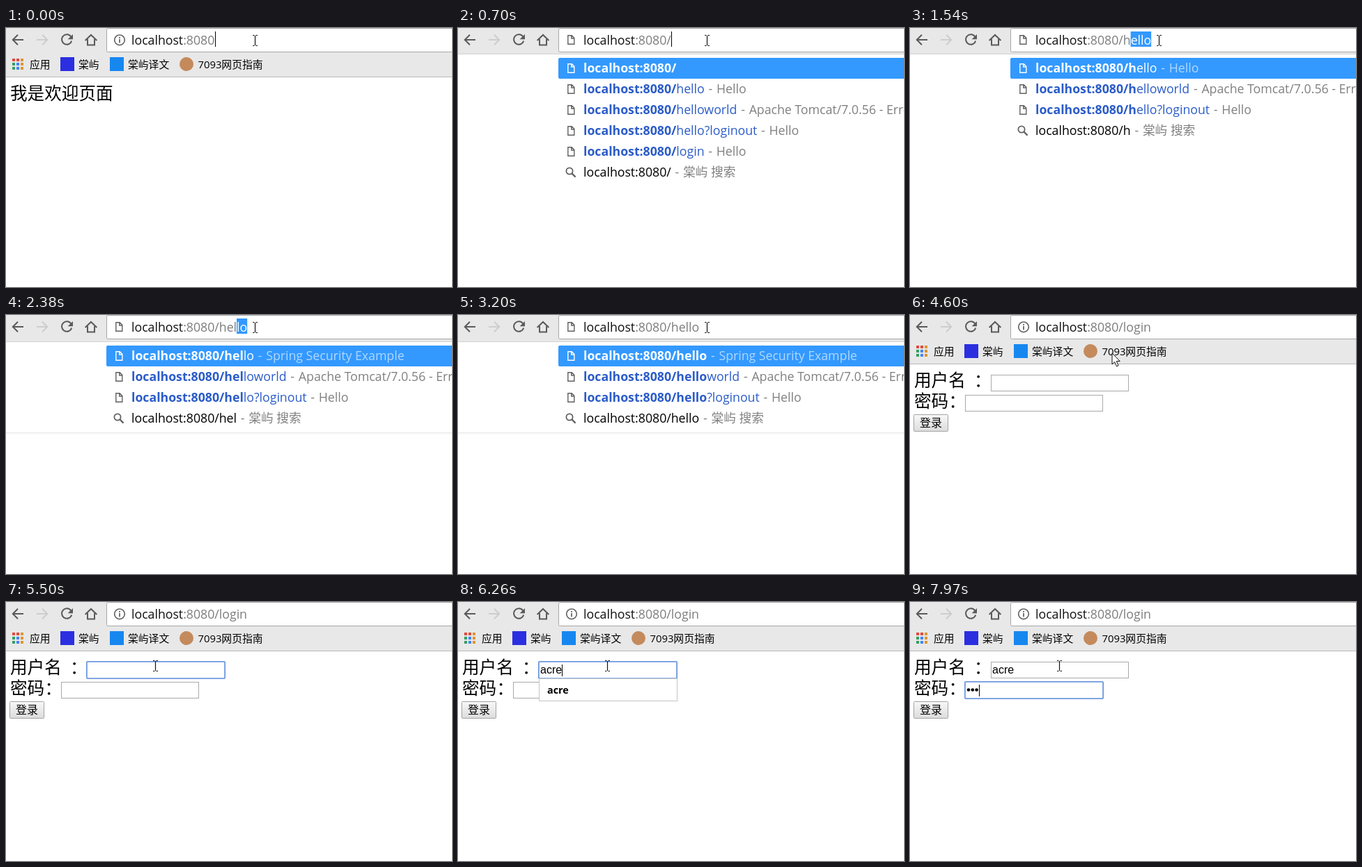
These frames come from a looping animation (640x373 px, 8 s). An HTML page:

```html
<!DOCTYPE html>
<html lang="zh-CN">
<head>
<meta charset="utf-8">
<title>Login demo</title>
<style>
  html, body { margin: 0; width: 100%; height: 100%; overflow: hidden; background: #fff; }
  svg { display: block; width: 100vw; height: 100vh; }
  text { white-space: pre; font: 17.7px "Open Sans", "Noto Sans CJK SC", "Noto Sans CJK", sans-serif; }
  .bold { font-weight: 700; }
  .sep { word-spacing: 1.2px; }
  .mark { font-size: 14.8px; }
  .page { font: 300 24.6px "Noto Sans CJK SC", "Noto Sans CJK", serif; }
  .button { font: 16px "Noto Sans CJK SC", "Noto Sans CJK", sans-serif; }
  .field { font: 16px "Liberation Sans", Arial, sans-serif; }
  .hint { font-size: 14.4px; font-weight: 700; }
</style>
</head>
<body>
<svg id="stage" viewBox="0 0 640 373" preserveAspectRatio="none"></svg>
<script>
const LOOP = 8000;
const HOST = 'localhost';
const PORT = ':8080';
const PATH = '/hello';
const ACCOUNT = 'acre';
const BLUE = '#3399ff';
const stage = document.getElementById('stage');
const pen = document.createElement('canvas').getContext('2d');

// Each list holds the moments at which one more character appears.
const pathKeys = [620, 1540, 2150, 2380, 2440, 2660];
const nameKeys = [5880, 5950, 6180, 6260];
const dotKeys = [7650, 7730, 7970];
const pointerPath = [
  [0, 357, 18], [4600, 290, 55], [4670, 262, 70],
  [4740, 236, 82], [4820, 222, 90], [4890, 214, 92]
];
const OPEN_LOGIN = 3280, FOCUS_NAME = 4970, FOCUS_PASS = 6640;

const within = (t, from, to) => t >= from && t < to;
const count = (keys, t) => keys.filter(k => k <= t).length;
const widthOf = (str, font) => { pen.font = font; return pen.measureText(str).width; };
const urlWidth = str => widthOf(str, '17.7px "Open Sans", sans-serif');
const fieldWidth = str => widthOf(str, '16px "Liberation Sans", Arial, sans-serif');

const rect = (x, y, w, h, fill, extra = '') =>
  `<rect x="${x}" y="${y}" width="${w}" height="${h}" fill="${fill}" ${extra}/>`;
const text = (x, y, body, cls = '', fill = '#000') =>
  `<text x="${x}" y="${y}" class="${cls}" fill="${fill}">${body}</text>`;
const span = (body, fill, cls = '') => `<tspan fill="${fill}" class="${cls}">${body}</tspan>`;
const line = (d, color, width = 2) =>
  `<path d="${d}" fill="none" stroke="${color}" stroke-width="${width}"/>`;
const caret = (x, y, h) => rect(Math.round(x), y, 1, h, '#000');

const pageIcon = (y, color) =>
  line(`M157.8 ${y - 6.3}h5.4l3.6 3.6v9h-9zM162.8 ${y - 6}v4h4`, color, 1.4);
const searchIcon = y =>
  `<circle cx="160" cy="${y - 2}" r="4.6" fill="none" stroke="#606060" stroke-width="1.8"/>` +
  line(`M163.4 ${y + 1.4}l5.2 5.2`, '#606060', 2.2);
const infoIcon =
  '<circle cx="163" cy="17.3" r="7.3" fill="none" stroke="#666" stroke-width="1.7"/>' +
  rect(162.1, 16, 1.8, 5.4, '#666') + rect(162.1, 13, 1.8, 1.9, '#666');

function toolbar(height, border) {
  const ink = '#5a5a5a';
  return rect(0, 0, 640, height, '#e8e8e8') + rect(0, height, 640, 1, border) +
    line('M25 17H10M17 9.8L9.8 17l7.2 7.2', ink) +
    line('M44 17h15M52 9.8l7.2 7.2-7.2 7.2', '#cdcdcd') +
    line('M93.2 12.4A7.2 7.2 0 1 0 94.2 18.6', ink) +
    `<path d="M96 9v7.3h-7.3z" fill="${ink}"/>` +
    line('M113.6 18L122 10l8.4 8M117 16v8.4h10V16', ink) +
    rect(144.5, .5, 510, 34, '#fff', 'rx="2" stroke="#a6a6a6"');
}

function bookmarks() {
  const colors = ['#df4b3f', '#df4b3f', '#dc9630', '#35a060', '#4285f4',
    '#dc9630', '#35a060', '#4285f4', '#dc9630'];
  const apps = colors.map((c, i) => rect(9 + i % 3 * 6, 44 + Math.floor(i / 3) * 6, 4, 4, c));
  return apps.join('') + text(34, 57.6, '应用', 'mark') +
    rect(78, 42, 20, 20, '#2b2fe0') + text(104, 57.6, '棠屿', 'mark') +
    rect(149, 42, 20, 20, '#1787f0') + text(175, 57.6, '棠屿译文', 'mark') +
    '<circle cx="259" cy="52" r="10" fill="#c48a5c"/>' +
    text(275.5, 57.6, '7093网页指南', 'mark');
}

function address(path, chosen = '') {
  const start = 180 + urlWidth(HOST + PORT + path);
  const box = chosen ? rect(start, 5, urlWidth(chosen), 22, BLUE) : '';
  return box + text(180, 24, span(HOST, '#111') + span(PORT + path, '#7d7d7d') + span(chosen, '#fff'));
}

function suggestions(t, typed) {
  const settled = t >= 1990;
  const top = settled ? 44 : 43;
  const rows = [
    ['/hello', t < 2150 ? 'Hello' : 'Spring Security Example'],
    ['/helloworld', 'Apache Tomcat/7.0.56 - Error report'],
    ['/hello?loginout', 'Hello']
  ];
  if (typed.length === 1) {
    rows.unshift(['/', '']);
    rows.push(['/login', 'Hello']);
  }
  const items = rows.map(([path, title], i) => {
    const y = top + 30 * i;
    const active = i === 0;
    const ink = active ? '#fff' : '#2b5cc8';
    const soft = active ? '#b0d8ff' : '#808080';
    const body = span(HOST + PORT + typed, ink, 'bold') + span(path.slice(typed.length), ink) +
      (title ? span(' - ', soft, 'sep') + span(title, soft) : '');
    return (active ? rect(144, y, 510, 30, BLUE, 'rx="2"') : '') +
      pageIcon(y + 15, active ? '#fff' : '#606060') + text(180, y + 21, body);
  });
  const y = top + 30 * rows.length;
  items.push(searchIcon(y + 15), text(180, y + 21,
    HOST + PORT + typed + span(' - ', '#808080', 'sep') + span('棠屿 搜索', '#808080')));
  const shade = settled ? rect(0, 169, 640, 1, '#e9e9e9') + rect(0, 170, 640, 2, '#f8f8f8') : '';
  return items.join('') + shade;
}

function input(x, y, focused) {
  return focused
    ? rect(x - .1, y - .1, 198.2, 24.2, '#fff', 'rx="1" stroke="#6f98dd" stroke-width="1.8"')
    : rect(x + .5, y + .5, 197, 23, '#fff', 'stroke="#a9a9a9"');
}

function loginForm(t) {
  const name = ACCOUNT.slice(0, count(nameKeys, t));
  const dots = count(dotKeys, t);
  const inName = within(t, FOCUS_NAME, FOCUS_PASS);
  const inPass = t >= FOCUS_PASS;
  let out = text(6, 103.3, '用户名', 'page') + text(92, 103.3, '：', 'page') +
    text(6, 133, '密码', 'page') + text(55.5, 133, '：', 'page') +
    input(116, 86, inName) + input(79, 115, inPass) +
    rect(5.5, 143.5, 49, 24, 'url(#face)', 'rx="1" stroke="#a3a3a3"') +
    text(14, 161, '登录', 'button') + text(118, 103, name, 'field');
  for (let i = 0; i < dots; i++) out += `<circle cx="${84 + 5.8 * i}" cy="126.5" r="2.3"/>`;
  if (inName && (t < 5500 || name)) out += caret(118 + fieldWidth(name), 90, 17);
  if (inPass && (t < 7100 || dots)) out += caret(81 + 6 * dots, 119, 17);
  if (inName && name) {
    out += rect(116.5, 110.5, 198, 32, '#fff', 'stroke="#c4c4c4"') + text(128, 132, ACCOUNT, 'hint');
  }
  return out;
}

function pointer(t) {
  const [at, x, y] = pointerPath.filter(p => p[0] <= t).pop();
  return within(at, 4600, 4820)
    ? `<path d="M${x} ${y}v16l3.7-3.4 2.8 6.4 2.6-1.2-2.8-6.2h5z" fill="#fff" stroke="#111"/>`
    : line(`M${x - 3} ${y - 7.5}h2.5m2 0h2.5M${x + .5} ${y - 7}V${y + 7}M${x - 3} ${y + 7.5}h2.5m2 0h2.5`, '#111', 1.2);
}

function scene(t) {
  const face = '<defs><linearGradient id="face" x2="0" y2="1">' +
    '<stop stop-color="#f8f8f8"/><stop offset="1" stop-color="#dcdcdc"/></linearGradient></defs>';
  let out = face + rect(0, 0, 640, 373, '#fff');
  if (within(t, 620, OPEN_LOGIN)) {
    const n = count(pathKeys, t);
    const typed = PATH.slice(0, n);
    out += toolbar(t < 1990 ? 37 : 38, '#d2d2d2') + pageIcon(17, '#606060') +
      address(typed, n > 1 ? PATH.slice(n) : '') + suggestions(t, typed);
    if (t < 1160 || within(t, 2660, 3200)) out += caret(180 + urlWidth(HOST + PORT + typed), 5, 22);
  } else {
    const login = t >= OPEN_LOGIN;
    out += toolbar(70, '#b8b8b8') + bookmarks() + infoIcon + address(login ? '/login' : '');
    out += login ? loginForm(t) : text(6, 103.3, '我是欢迎页面', 'page');
    if (t < 390) out += caret(300, 5, 22);
  }
  return out + pointer(t);
}

let shown = '';
const began = performance.now();
function draw() {
  const markup = scene((performance.now() - began) % LOOP);
  if (markup !== shown) stage.innerHTML = shown = markup;
  requestAnimationFrame(draw);
}
draw();
</script>
</body>
</html>
```
